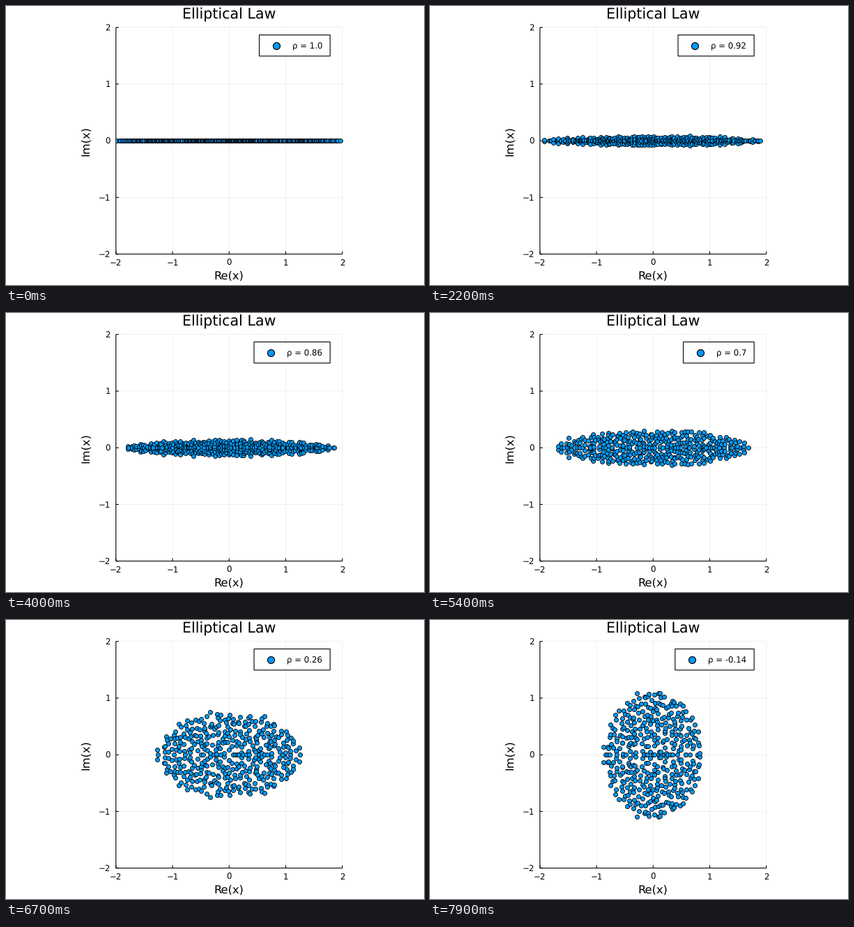
Animation, 600 px wide and 400 px high, one loop 8000 ms. Source, as a matplotlib script:

```python
import numpy as np
import matplotlib
import matplotlib.pyplot as plt
from matplotlib.animation import FuncAnimation
from matplotlib.patches import Rectangle

W, H, DPI = 600, 400, 100
FRAMES, STEP = 80, 100
N = 400            # matrix size
BLOCK, POOL = 10, 4  # frames per block, matrices drawn per block
PT = 72 / DPI      # pixels to points
BLUE = "#009afa"
LEFT, TOP, SIDE = 157.8, 30.7, 325
UNIT = SIDE / 4

matplotlib.rcParams.update({
    "font.family": "DejaVu Sans",
    "path.snap": False,
    "text.hinting": "none",
})


def rho_300(k):
    """Correlation in units of 1/300: slow at first, then ten times faster."""
    return 300 - k - 9 * max(0, k - 50)


def spectrum(rho, rng):
    """Eigenvalues of a real elliptic random matrix."""
    g = rng.standard_normal((N, N))
    sym, anti = g + g.T, g - g.T
    m = np.sqrt(1 + rho) * sym + np.sqrt(1 - rho) * anti
    return np.linalg.eigvals(m / (2 * np.sqrt(N)))


rng = np.random.default_rng(7)
pools = []
for start in range(0, FRAMES, BLOCK):
    mid = rho_300(start + BLOCK // 2) / 300
    pools.append((mid, [spectrum(mid, rng) for _ in range(POOL)]))


def cloud(k):
    """Block sample rescaled to the ellipse of step k, mirrored on reuse."""
    rho = rho_300(k) / 300
    block, i = divmod(k, BLOCK)
    mid, samples = pools[block]
    z = samples[i % POOL]
    flip = -1 if (i // POOL) % 2 else 1
    re = flip * z.real * (1 + rho) / (1 + mid)
    im = z.imag * (1 - rho) / (1 - mid)
    return np.sort(re + 1j * im)


def px(x):
    return LEFT + (x + 2) * UNIT


def py(y):
    return TOP + (2 - y) * UNIT


fig = plt.figure(figsize=(W / DPI, H / DPI), dpi=DPI, facecolor="white")
ax = fig.add_axes([0, 0, 1, 1])
ax.set_xlim(0, W)
ax.set_ylim(H, 0)
ax.axis("off")


def line(xs, ys, color="black", width=1.1, z=1):
    ax.plot(xs, ys, color=color, lw=width * PT, zorder=z, solid_capstyle="butt")


def text(x, y, s, size, ha="center", va="baseline", **kw):
    return ax.text(x, y, s, fontsize=size * PT, ha=ha, va=va, **kw)


right, bottom = LEFT + SIDE, TOP + SIDE
for v in range(-2, 3):
    x, y = px(v), py(v)
    line([x, x], [TOP, bottom], "#e6e6e6", 0.6, 0)
    line([LEFT, right], [y, y], "#e6e6e6", 0.6, 0)
    line([x, x], [bottom, bottom - 4])
    line([LEFT, LEFT + 4], [y, y])
    name = str(v).replace("-", "\u2212")
    text(x, 372, name, 11.8)
    text(150, y + 4.3, name, 11.8, "right")
line([LEFT, LEFT], [TOP, bottom])
line([LEFT, right], [bottom, bottom])

text(320, 18.8, "Elliptical Law", 20.7)
text(320, 392, "Re(x)", 16.25)
text(122.5, 193.2, "Im(x)", 16.25, "right", "center", rotation=90)

dots, = ax.plot([], [], "o", ms=6.1 * PT, mfc=BLUE, mec="black", mew=0.85 * PT, zorder=3)
dots.set_clip_path(Rectangle((LEFT, TOP), SIDE, SIDE, transform=ax.transData))

frame = ax.add_patch(Rectangle((0, 41.5), 1, 30.3, fc="white", ec="black",
                               lw=1.1 * PT, zorder=5))
key, = ax.plot([], [], "o", ms=10 * PT, mfc=BLUE, mec="black", mew=1.2 * PT, zorder=6)
label = text(454, 61.3, "", 11.8, "right", zorder=6)


def update(k):
    z = cloud(k)
    dots.set_data(px(z.real), py(z.imag))
    label.set_text(f"\u03c1 = {rho_300(k) // 3 / 100}")
    box = label.get_window_extent()
    x = ax.transData.inverted().transform((box.x0, box.y0))[0]
    key.set_data([x - 23], [56.7])
    frame.set_x(x - 47)
    frame.set_width(465.2 - (x - 47))
    return dots, label, key, frame


anim = FuncAnimation(fig, update, frames=FRAMES, interval=STEP,
                     repeat=True, repeat_delay=0, blit=False)
plt.show()
```
